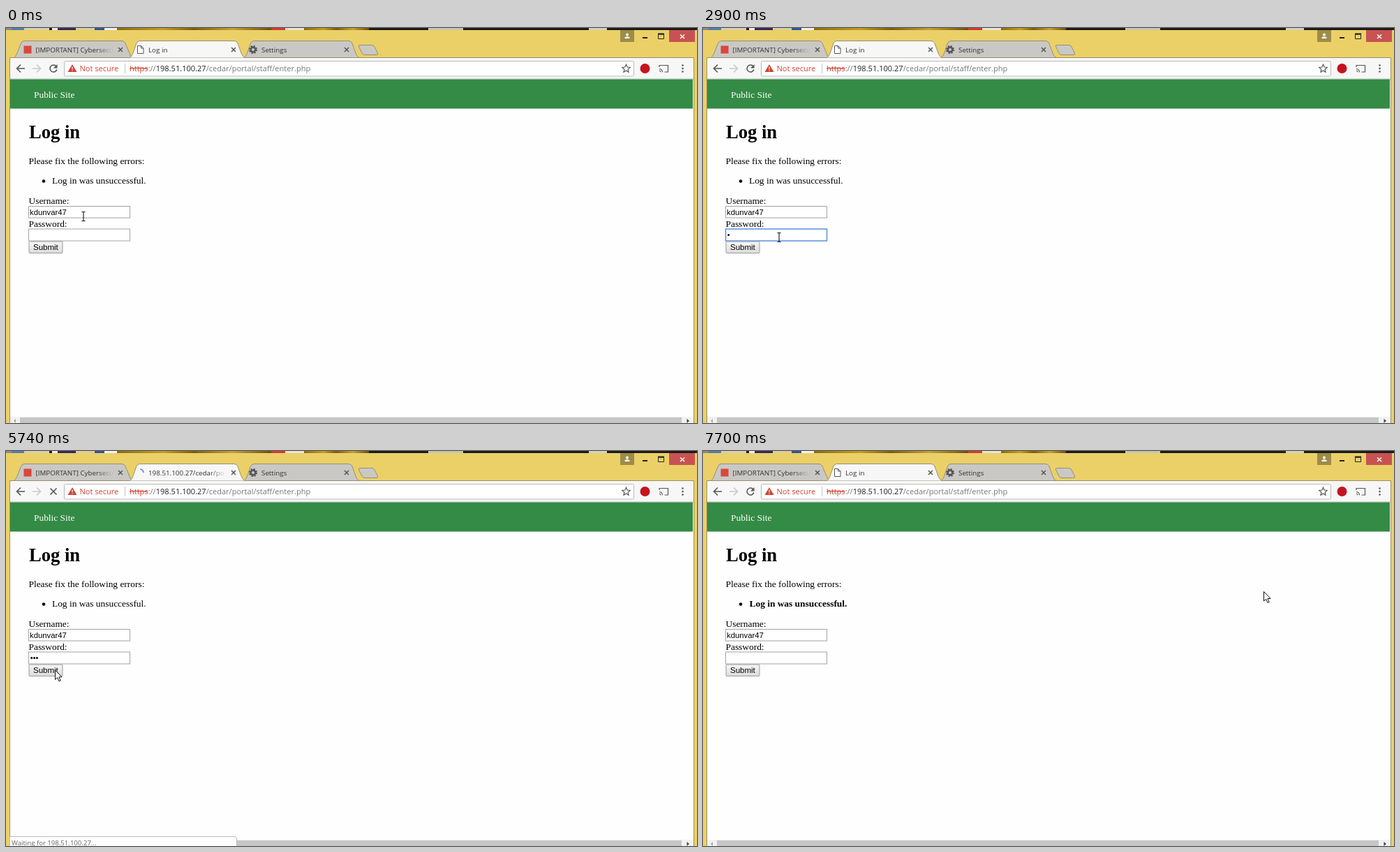
Recreate the animation shown at these times as an HTML page. Size 990 by 566 pixels, loop 8 s.

```html
<!DOCTYPE html>
<html lang="en">
<head>
<meta charset="utf-8">
<title>Log in</title>
<style>
  html, body { margin: 0; width: 100%; height: 100%; overflow: hidden; background: #fefefe; }
  svg { display: block; width: 990px; height: 566px; }
  text { white-space: pre; }
  .ui { font-family: "Open Sans", "Noto Sans", sans-serif; font-size: 9.8px; fill: #333; }
  .url { font-size: 11.05px; }
  .page { font-family: "Liberation Serif", "Times New Roman", serif; font-size: 13.4px; fill: #000; }
  .field { font-family: "Liberation Sans", Arial, sans-serif; font-size: 11.3px; fill: #000; }
  .line { fill: none; stroke: #555; stroke-width: 1.6; }
  .x { fill: none; stroke: #555; stroke-width: 1.5; }
  .tab { fill: #c9c8c5; stroke: #97906f; }
  .box { fill: #fff; stroke: #a3a3a3; }
  .box.focus { stroke: #5b8fe0; stroke-width: 1.5; }
</style>
</head>
<body>
<svg viewBox="0 0 990 566">
  <defs>
    <linearGradient id="fade1" gradientUnits="userSpaceOnUse" x1="130" x2="154" y1="0" y2="0">
      <stop stop-color="#333"/><stop offset="1" stop-color="#333" stop-opacity="0"/>
    </linearGradient>
    <linearGradient id="fade2" gradientUnits="userSpaceOnUse" x1="292" x2="315" y1="0" y2="0">
      <stop stop-color="#333"/><stop offset="1" stop-color="#333" stop-opacity="0"/>
    </linearGradient>
    <linearGradient id="button" x2="0" y2="1">
      <stop stop-color="#f6f6f6"/><stop offset="1" stop-color="#dcdcdc"/>
    </linearGradient>
    <linearGradient id="pressed" x2="0" y2="1">
      <stop stop-color="#d6d6d6"/><stop offset="1" stop-color="#f0f0f0"/>
    </linearGradient>
    <linearGradient id="gold">
      <stop stop-color="#8a6a10"/><stop offset=".3" stop-color="#c79c1c"/>
      <stop offset=".5" stop-color="#7a5a10"/><stop offset=".75" stop-color="#c8a030"/>
      <stop offset="1" stop-color="#6d4c10"/>
    </linearGradient>
  </defs>

  <!-- window frame and the sliver of desktop above it -->
  <rect width="990" height="566" fill="#ebd068"/>
  <g id="desktop"></g>
  <rect x="5" y="43" width="980" height="523" fill="#fefefe"/>
  <rect x="5" y="43" width="980" height="30" fill="#f7f7f7"/>
  <path d="M5.5 566V42.5H985.5V566" fill="none" stroke="#9a905f"/>

  <!-- tabs -->
  <path class="tab" d="M341 42.5Q344 41 346 35L350 23Q351.500 18.500 355 18.500H491Q494.500 18.500 496 22L501 36Q503 41.500 506 42.500Z"/>
  <path class="tab" d="M11.500 42.500Q14 41 16 36L21 23Q22.500 18.500 26 18.500H166Q169.500 18.500 171 22L177 36Q178 41 181 42.500Z"/>
  <path d="M177 43Q180 41.500 182 36L186.500 23Q188 18.500 192 18.500H327Q330.500 18.500 332 22L337 36Q339 41.500 343 43Z" fill="#f7f7f7" stroke="#97906f"/>
  <rect x="176" y="43" width="168" height="2" fill="#f7f7f7"/>
  <path class="tab" d="M507 24.500H524Q527 24.500 528 27L532.500 36Q533.500 38.500 531 38.500H514Q511.500 38.500 510 36L505.500 27Q504.500 24.500 507 24.500Z"/>
  <rect x="25.500" y="25.500" width="11" height="11" fill="#d9473c"/>
  <text class="ui" x="42.500" y="34.500" style="fill:url(#fade1)">[IMPORTANT] Cybersecu</text>
  <text class="ui" id="title" x="204" y="34.500">Log in</text>
  <text class="ui" x="366" y="34.500">Settings</text>
  <g class="x">
    <path d="M161 28l6 6m0-6l-6 6"/><path d="M323 28l6 6m0-6l-6 6"/><path d="M485 28l6 6m0-6l-6 6"/>
  </g>
  <path id="fileIcon" d="M188.500 25.500H193.500L197 29V36.500H188.500ZM193.500 25.500V29H197" fill="#fff" stroke="#555"/>
  <path id="spinner" d="M187 31A5 5 0 0 1 192 26" fill="none" stroke-width="1.6"/>
  <g transform="translate(354 31)" fill="none" stroke="#555">
    <circle r="3.400" stroke-width="2.600"/>
    <circle r="5.200" stroke-width="1.800" stroke-dasharray="2.300 1.784"/>
  </g>

  <!-- window buttons -->
  <rect x="880" y="3" width="20" height="17" fill="#9d8c48"/>
  <path d="M886.500 15V13.500Q890 11 893.500 13.500V15Z" fill="#fff"/><circle cx="890" cy="9.500" r="2" fill="#fff"/>
  <rect x="912" y="13" width="7" height="2" fill="#222"/>
  <path d="M934.500 9V15.500H942.500V9Z" fill="none" stroke="#222"/><path d="M934 8.500H943" stroke="#222" stroke-width="2"/>
  <rect x="950" y="3" width="37" height="17" fill="#c85252"/>
  <path d="M966 9.500l6 5.500m0-5.500l-6 5.500" stroke="#fff" stroke-width="1.600"/>

  <!-- toolbar -->
  <path class="line" d="M27 58H16M21 52.500L15.500 58L21 63.500"/>
  <path class="line" style="stroke:#c9c9c9" d="M38 58H49M44 52.500L49.500 58L44 63.500"/>
  <g id="reload"><path class="line" d="M72 55A5 5 0 1 0 72.800 59.500"/><path d="M73.500 52V57.500H68Z" fill="#555"/></g>
  <path id="stop" class="line" d="M63.500 53.500l9 9m0-9l-9 9"/>
  <rect x="83.500" y="47.500" width="816" height="21.500" rx="2" fill="#fff" stroke="#b9b9b9"/>
  <path d="M95 52L101.500 63H88.500Z" fill="#cf4432"/><path d="M95 55.500V59.300M95 60.300V61.600" stroke="#fff" stroke-width="1.200"/>
  <text class="ui url" x="105.500" y="62" style="fill:#cf4432">Not secure</text>
  <path d="M170.500 51V65" stroke="#c4c4c4"/>
  <text class="ui url" x="177" y="62" style="fill:#777"><tspan fill="#cf4432" text-decoration="line-through">https</tspan>://<tspan fill="#222">198.51.100.27</tspan>/cedar/portal/staff/enter.php</text>
  <path d="M888.500 52.300L890.100 56L894.200 56.400L891.100 59.100L892 63.200L888.500 61L885 63.200L885.900 59.100L882.800 56.400L886.900 56Z" fill="none" stroke="#555" stroke-width="1.200"/>
  <circle cx="915.500" cy="58" r="7" fill="#c5141e"/>
  <path d="M936 56V53.500H948.500V63H943.500M936 58.500A5 5 0 0 1 940.500 63.300M936 61A2.500 2.500 0 0 1 938 63.300" fill="none" stroke="#555" stroke-width="1.200"/>
  <g fill="#555"><circle cx="969.500" cy="53.500" r="1.300"/><circle cx="969.500" cy="58" r="1.300"/><circle cx="969.500" cy="62.500" r="1.300"/></g>
  <path d="M6 73H985" stroke="#b9bcb4"/>

  <!-- page -->
  <rect x="6" y="73.500" width="978" height="42" fill="#348b45"/>
  <text class="page" x="40" y="100" style="fill:#fff">Public Site</text>
  <text class="page" x="33" y="158" style="font-size:26.600px;font-weight:bold">Log in</text>
  <text class="page" x="32.500" y="195">Please fix the following errors:</text>
  <circle cx="54" cy="219.500" r="2.300"/>
  <text class="page" id="error" x="66" y="223">Log in was unsuccessful.</text>
  <text class="page" x="32.500" y="252">Username:</text>
  <rect class="box" id="username" x="32.500" y="255.500" width="145" height="16.500"/>
  <text class="field" x="34" y="268">kdunvar47</text>
  <text class="page" x="32.500" y="284.500">Password:</text>
  <rect class="box" id="password" x="32.500" y="288" width="145" height="17"/>
  <g id="dots"><circle cx="36.600" cy="296.500" r="1.500"/><circle cx="40.500" cy="296.500" r="1.500"/><circle cx="44.400" cy="296.500" r="1.500"/></g>
  <rect id="caret" width="1" height="13"/>
  <rect id="submit" x="33" y="306" width="48" height="16.500" rx="1" stroke="#9c9c9c"/>
  <text class="field" x="39" y="318" style="font-size:11.500px">Submit</text>

  <!-- scrollbar and status bubble -->
  <rect x="6" y="557" width="979" height="9" fill="#f1f1f1"/>
  <rect x="20" y="558" width="948" height="8" fill="#c6c6c6"/>
  <path d="M14 560V566L11 563Z" fill="#a8a8a8"/><path d="M975.500 560V566L979 563Z" fill="#444"/>
  <g id="status">
    <path d="M5.500 567V552.500H327Q330.500 552.500 330.500 556V567" fill="#fdfdfd" stroke="#bcbcbc"/>
    <text class="ui" x="8" y="565" style="font-size:9.600px;fill:#666">Waiting for 198.51.100.27...</text>
  </g>

  <path id="beam" d="M-2.500-6.500H-.8L0-5.700L.8-6.500H2.500M0-5.700V5.700M-2.500 6.500H-.8L0 5.700L.8 6.500H2.500" fill="none" stroke="#111" stroke-width="1.100"/>
  <path id="arrow" d="M0 0V13.500L3.200 10.700L5.500 16L7.700 15L5.400 9.900H9.600Z" fill="#fff" stroke="#111"/>
</svg>
<script>
const LOOP = 8000;
const $ = id => document.getElementById(id);

// Desktop strip: start, end, colour
const strip = [
  [0, 990, '#1d1a14'], [0, 8, '#8f8a78'], [8, 26, '#4f7fb0'], [26, 62, '#d8cfae'], [66, 74, '#eee'], [74, 100, '#32265c'],
  [100, 127, '#d9cda0'], [127, 141, '#2b5797'], [141, 159, '#f2f2f2'], [159, 380, 'url(#gold)'],
  [380, 400, '#cf3b30'], [400, 427, '#e9e4d6'], [427, 520, 'url(#gold)'],
  [605, 655, '#c9c3b2'], [835, 861, '#d6d0c0']
];
$('desktop').innerHTML = strip.map(([a, b, fill]) =>
  `<rect x="${a}" width="${b - a}" height="3" fill="${fill}"/>`).join('');

// Each track lists [start time, ...held values]
const pointer = [
  [0, 'beam', 111, 270], [140, 'beam', 111, 268], [320, 'beam', 111, 264],
  [870, 'beam', 114, 271], [990, 'beam', 111, 292], [1110, 'beam', 109, 300],
  [3770, 'beam', 104, 303], [3890, 'arrow', 84, 314], [4010, 'arrow', 76, 316], [4160, 'arrow', 70.5, 314],
  [7050, 'arrow', 180, 268], [7170, 'arrow', 380, 212], [7290, 'arrow', 543, 214],
  [7570, 'arrow', 690, 200], [7700, 'arrow', 803.5, 201.5]
];
const caret = [
  [0, 0], [730, 87, 257], [1110, 0], [1700, 34.5, 290], [2220, 0], [2370, 38, 290], [2900, 0],
  [3060, 42, 290], [3370, 46, 290], [3890, 0], [4430, 46, 290], [4840, 0]
];
const focus = [[0, ''], [730, 'username'], [1700, 'password'], [4840, '']];
const typed = [[0, 0], [2370, 1], [3060, 2], [3370, 3], [5880, 0]];
const spin = [[0, null], [4980, 74], [5100, 41], [5250, 0], [5370, -33], [5490, -66], [5740, 90], [5880, 130], [6000, null]];
const bubble = [[0, 0], [5370, 1], [6400, .5], [6520, 0]];

const at = (track, t) => track.findLast(step => step[0] <= t).slice(1);
const show = (id, on) => { $(id).style.display = on ? '' : 'none'; };

function render(t) {
  const [shape, x, y] = at(pointer, t);
  for (const id of ['beam', 'arrow']) show(id, id === shape);
  $(shape).setAttribute('transform', `translate(${x} ${y})`);

  const [caretX, caretY] = at(caret, t);
  show('caret', caretX);
  $('caret').setAttribute('x', caretX);
  $('caret').setAttribute('y', caretY || 0);

  const [focused] = at(focus, t);
  for (const id of ['username', 'password']) $(id).classList.toggle('focus', id === focused);

  const [count] = at(typed, t);
  [...$('dots').children].forEach((dot, i) => { dot.style.display = i < count ? '' : 'none'; });

  const [angle] = at(spin, t);
  const loading = angle !== null;
  show('spinner', loading);
  show('fileIcon', !loading);
  show('stop', loading);
  show('reload', !loading);
  if (loading) $('spinner').setAttribute('transform', `rotate(${angle} 192 31)`);
  $('spinner').setAttribute('stroke', t < 5740 ? '#aaa' : '#4a86d8');

  const pending = t >= 5740 && t < 5880;
  $('title').textContent = pending ? '198.51.100.27/cedar/po' : 'Log in';
  $('title').style.fill = pending ? 'url(#fade2)' : '';

  const reloaded = t >= 5880;
  $('error').style.fontWeight = reloaded ? 'bold' : '';
  $('error').setAttribute('x', reloaded ? 66.5 : 66);
  $('submit').setAttribute('fill', t >= 4840 && t < 4980 ? 'url(#pressed)' : 'url(#button)');
  $('status').style.opacity = at(bubble, t)[0];
}

const start = performance.now();
function tick() {
  render((performance.now() - start) % LOOP);
  requestAnimationFrame(tick);
}
tick();
</script>
</body>
</html>
```
